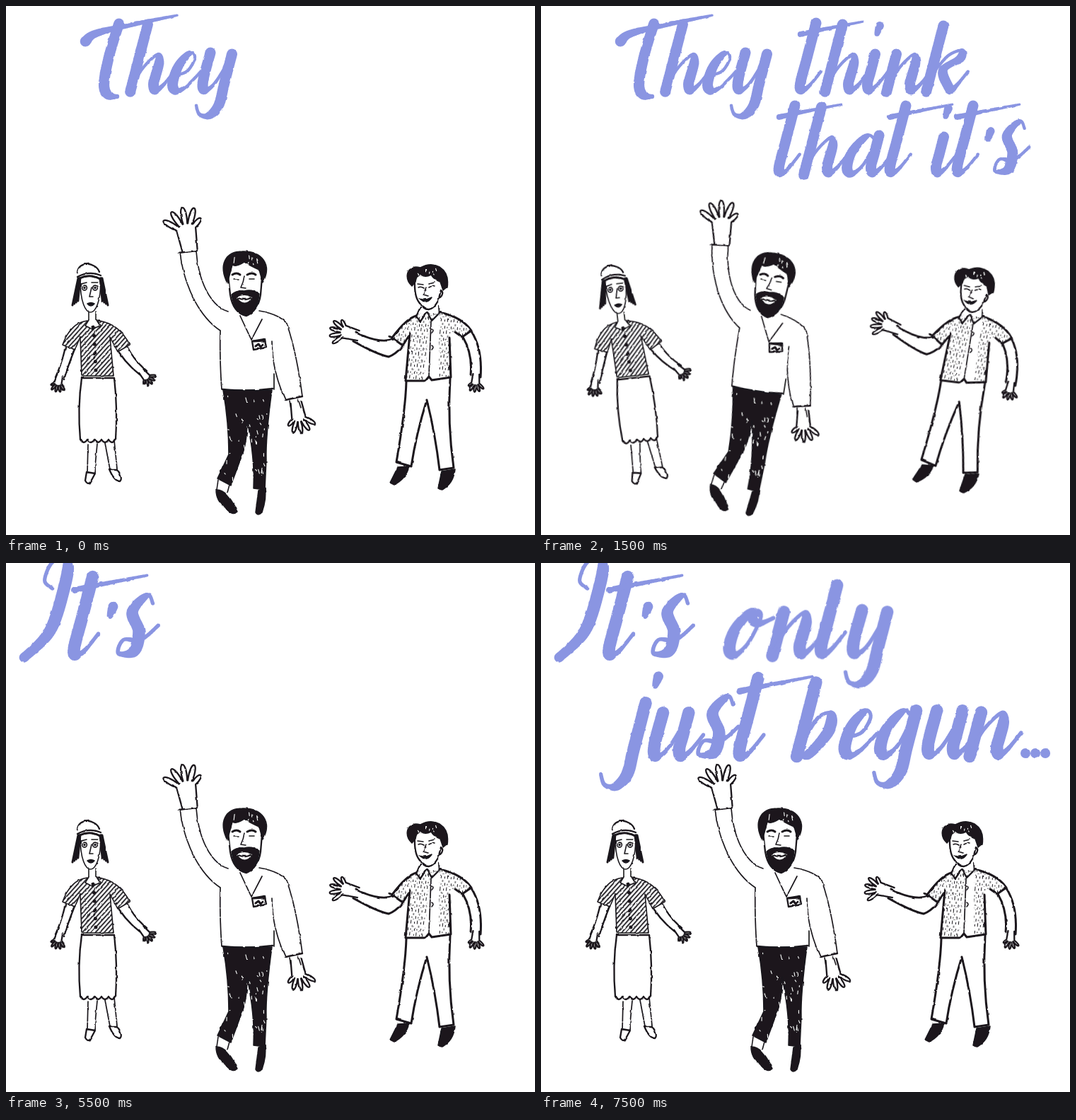
Recreate the animation shown at these times as an HTML page. Size 748 by 748 pixels, loop 8 s.

```html
<!DOCTYPE html>
<html lang="en">
<head>
<meta charset="utf-8">
<title>Waving people</title>
<style>
  html, body { margin: 0; width: 100%; height: 100%; overflow: hidden; background: #fff; }
  svg { display: block; width: 100vw; height: 100vh; }
  #lettering { fill: #8a95e2; }
  .person { fill: none; stroke: #1a181c; stroke-width: 2.3; stroke-linecap: round; stroke-linejoin: round; }
  .ink { fill: #1a181c; stroke-width: 1.5; }
  .white { fill: #fff; stroke: none; }
  .scratch { stroke: #fff; stroke-width: 1.1; }
  .bold { stroke-width: 3; }
  .fine { stroke-width: 1.6; }
  .loose { stroke-width: 1.7; stroke-dasharray: 28 2 11 2; }
</style>
</head>
<body>
<svg viewBox="0 0 748 748" role="img" aria-label="They think that it's all over! It's only just begun...">
  <defs>
    <filter id="rough">
      <feTurbulence type="fractalNoise" baseFrequency=".1" numOctaves="2" seed="4"/>
      <feDisplacementMap in="SourceGraphic" scale="2.4" xChannelSelector="R" yChannelSelector="G"/>
    </filter>
    <pattern id="hatch" width="4.6" height="20" patternUnits="userSpaceOnUse" patternTransform="rotate(42)">
      <path d="M2 0V20" stroke="#1a181c" stroke-width="1.8"/>
    </pattern>
    <pattern id="speckle" width="9" height="17" patternUnits="userSpaceOnUse" patternTransform="rotate(6)">
      <path d="M1.5 0v5M4 7v3M6.5 2v3M2 12v2M7.5 11v4M4.5 15v1" stroke="#1a181c"/>
    </pattern>
  </defs>

  <g id="lettering" filter="url(#rough)"></g>

  <g class="person" data-sway="rotate(-6.3 130 520)"><g id="woman" filter="url(#rough)">
    <path class="fine" fill="url(#hatch)" d="M115 445Q91 448 80 479L97 487L105 468L107 523H152L147 468L158 489L175 479Q160 449 131 445L123 458Z"/>
    <path d="M101 377C102 360 127 362 132 376M101 383Q118 374 134 381"/>
    <path class="bold" d="M104 385Q119 378 133 386"/>
    <path class="fine" d="M105 388C105 448 134 448 134 388M106 393L114 391M121 391L130 391M121 398L118 411H123M117 432V445M127 432V445"/>
    <path class="ink" d="M115 421Q120 418 125 421Q120 427 115 421Z"/>
    <path class="fine" fill="#fff" d="M117 444L112 452L122 457L133 452L128 444"/>
    <path stroke-width="5" stroke-dasharray="0 12.2" d="M124 454L127 516"/>
    <path d="M84 483Q79 505 70 525M96 488Q88 508 82 528M172 483Q182 502 199 516M160 490Q172 508 189 521"/>
    <path d="M107 526Q101 570 105 613M153 526Q158 570 155 613M107 526H153"/>
    <path class="loose" d="M116 620L115 660M129 619L125 661M140 618L147 655M153 614L157 654"/>
    <path d="M114 659L112 671Q115 677 119 674L126 661ZM146 655Q153 672 161 672Q166 668 157 655Z"/>
  </g></g>

  <g class="person" data-sway="rotate(9 316 316)"><g id="man" filter="url(#rough)">
    <path d="M244 349L270 346"/>
    <path class="loose" d="M246 349C251 390 270 437 303 459M269 347C272 390 290 425 314 432"/>
    <path class="ink" d="M313 392C300 366 310 347 334 347C362 346 377 366 363 391L358 373Q345 367 337 362Q325 370 320 366Z"/>
    <path d="M314 381L317 408Q321 434 340 438Q357 430 360 408L362 384"/>
    <path class="bold" d="M320 380Q326 376 331 380M341 380Q348 376 353 380"/>
    <path class="fine" d="M322 386H329M344 386H351M337 382Q336 390 332 398L339 399"/>
    <path class="ink" d="M319 408Q323 436 340 438Q356 432 358 407Q348 400 337 403Q326 402 319 408Z"/>
    <path class="white" d="M326 412Q337 406 348 412Q338 427 326 412Z"/>
    <path d="M328 413Q338 417 346 413"/>
    <path class="loose" d="M303 459Q302 500 305 542M358 431Q387 436 397 449Q411 490 419 552M331 438L347 472L362 443M376 474Q376 515 395 557M379 520V541"/>
    <path d="M395 557L419 552M306 542Q340 546 377 541M348 474L366 471L368 483L350 486Z"/>
    <path class="bold" d="M350 474L365 473M353 481L357 478L360 482L364 479"/>
    <path class="ink" d="M307 543H376Q367 610 368 642L366 684L350 682Q352 640 341 586Q341 620 332 640L318 678L299 668L315 634Q315 590 307 543Z"/>
    <path class="ink" d="M297 684Q313 683 327 715Q320 722 310 709Q297 700 297 684ZM357 685L366 683Q369 695 362 716Q356 722 353 716Z"/>
    <path class="fine" d="M300 670L298 684M316 677L313 688M401 558L403 570M413 556L417 568"/>
  </g></g>

  <g class="person" data-sway="rotate(7 572 528)"><g id="friend" filter="url(#rough)">
    <path stroke="none" fill="url(#speckle)" d="M582 436L565 445L546 469L561 480L571 465L566 529H590L599 448L611 434ZM613 433Q645 440 657 459L645 468L630 460L628 524H612V450Z"/>
    <path class="ink" d="M574 396Q565 388 568 377Q573 366 586 370Q600 362 613 369Q627 378 624 397L618 402L614 390Q605 387 601 380Q592 385 586 379Q580 381 579 390Z"/>
    <path d="M578 387Q577 410 584 419Q598 440 611 417L615 402Q620 406 614 412"/>
    <path class="fine" d="M582 393L590 394M583 398Q587 396 591 399M598 393L606 391M598 398Q602 395 606 397M594 398L590 408L597 410"/>
    <path class="ink" d="M585 414Q593 417 602 412Q595 423 585 414Z"/>
    <path d="M586 426L580 439L586 446L594 434M612 424L613 434L602 445L596 434"/>
    <path class="bold" d="M580 438Q566 442 546 469M543 467L561 480L570 466M571 463L565 530H593L598 524L602 529L629 525L627 469M613 433Q645 440 658 459L645 468L635 461"/>
    <path class="loose" d="M601 446L598 523"/>
    <path class="fine" d="M602 457Q606 460 602 463M602 480Q606 482 602 486"/>
    <path class="bold" d="M547 471Q529 478 495 462M491 474Q525 493 541 496Q550 493 560 482M658 460Q674 485 671 525M646 468Q660 492 657 522"/>
    <path class="bold" d="M566 531Q565 570 552 645L573 651Q580 605 595 557Q607 605 613 656L633 653Q624 590 628 527"/>
    <path class="ink" d="M554 652L570 651Q566 668 549 677L543 674ZM616 658L635 655Q633 675 617 684L611 682Z"/>
  </g></g>
</svg>

<script>
const LOOP = 8000, BEAT = 500, SLANT = .26;

function add(parent, tag, attrs) {
  const el = document.createElementNS('http://www.w3.org/2000/svg', tag);
  for (const name in attrs) el.setAttribute(name, attrs[name]);
  return parent.appendChild(el);
}

// Parts shared by the letters: upright, with the baseline at y = 0.
const stem = (x, top) => [[x, top], [x, 2]];
const hook = (x, top) => [[x, top], [x, top / 2], [x, -10], [x + 5, -1], [x + 14, -8], [x + 25, -28]];
const arch = x => [[x, -6], [x + 9, -32], [x + 24, -51], ...hook(x + 30, -42)];
const cup = x => [[x, -54], [x, -14], [x + 6, -1], [x + 18, -12], [x + 31, -50]];
const tail = (x, top) => [[x, top], [x, -10], [x, 20], [x - 10, 35], [x - 24, 33], [x - 32, 20]];
const bowl = w => [[w, -46], [w * .6, -54], [w * .1, -32], [w * .05, -8], [w * .35, 0], [w * .75, -14], [w, -44]];
const taper = (width, ...points) => Object.assign(points, { width });
const dab = (x, y) => taper(12, [x, y], [x - 1, y + 12]);
const dot = () => taper(12, [0, 0], [1, 0]);
const bar = () => taper(8, [-18, -80], [8, -86], [66, -98]);

// Each letter: its advance, then its strokes.
const LETTERS = {
  T: [68, taper(15, [-14, -70], [6, -84], [107, -107]), [[27, -95], [25, -50], [28, -10], [38, 6], [52, 8]]],
  I: [61, [[16, -82], [4, -92], [8, -114], [26, -114], [30, -80], [26, -30], [3, 2]]],
  a: [62, bowl(32), hook(35, -54)],
  b: [55, stem(0, -88), [[4, -20], [14, -46], [28, -50], [30, -28], [12, 0], [0, -8]]],
  e: [42, [[0, -22], [16, -28], [22, -46], [14, -54], [2, -36], [0, -10], [8, 0], [20, -6], [36, -28]]],
  g: [58, bowl(30), tail(33, -54)],
  h: [57, stem(0, -94), arch(0)],
  i: [30, hook(0, -52), dab(-4, -92)],
  j: [24, tail(0, -66), dab(7, -98)],
  k: [56, stem(0, -92), [[4, -28], [18, -50], [34, -57], [36, -46], [16, -30], [28, -8], [37, -3], [52, -28]]],
  l: [38, hook(0, -84)],
  n: [56, stem(0, -52), arch(0)],
  o: [56, [...bowl(30), [25, -53], [20, -44], [30, -38], [46, -45]]],
  r: [78, stem(0, -50), [[0, -8], [8, -32], [22, -48], [32, -42], [50, -53]]],
  s: [50, [[28, -64], [19, -74], [6, -54], [20, -30], [20, -6], [2, -4], [4, -20], [25, -20], [42, -38]]],
  t: [38, hook(0, -96), bar()],
  u: [54, cup(0), hook(31, -54)],
  v: [46, [[0, -46], [4, -10], [8, -1], [20, -16], [32, -46], [42, -42]]],
  y: [0, cup(0), tail(31, -52)],
  "'": [15, dab(-4, -60)],
  '!': [0, taper(17, [0, -78], [2, -10]), dab(2, 8)],
  '.': [12, dot()]
};

// One word appears on every beat.
const PHRASES = [
  { start: 0, end: 5500, scale: 1, words: [
    ['They', 108, 120], ['think', 364, 120], ['that', 334, 237], ["it's", 556, 237], ['all', 100, 334], ['over!', 268, 328]] },
  { start: 5500, end: LOOP, scale: 1.17, words: [
    ["It's", 22, 132], ['only', 262, 130], ['just', 128, 275], ['begun', 362, 272], ['...', 685, 269]] }
];

const spline = (a, b, c, d, u) =>
  b + u / 2 * (c - a + u * (2 * a - 5 * b + 4 * c - d + u * (3 * (b - c) + d - a)));

// Presses the brush on downward movement and lifts it on the way up.
function brush(parent, stroke) {
  const p = stroke.map(([x, y]) => [x - SLANT * y, y]);
  const last = p.length - 1;
  let [x, y] = p[0], width, d = '';
  for (let i = 0; i < last; i++) {
    const from = p[i], to = p[i + 1];
    const before = p[i - 1] || from, after = p[i + 2] || to;
    const steps = Math.ceil(Math.hypot(to[0] - from[0], to[1] - from[1]) / 1.5);
    for (let k = 1; k <= steps; k++) {
      const [nx, ny] = [0, 1].map(c => spline(before[c], from[c], to[c], after[c], k / steps));
      const down = Math.max(0, (ny - y) / (Math.hypot(nx - x, ny - y) || 1));
      const target = stroke.width ? stroke.width - (stroke.width - 3) * (i + (k - 1) / steps) / last : 4.5 + 11 * down;
      width = width === undefined ? target : width + (target - width) * .2;
      const r = width / 2;
      d += `M${x - r} ${y}a${r} ${r} 0 1 0 ${width} 0a${r} ${r} 0 1 0 ${-width} 0`;
      [x, y] = [nx, ny];
    }
  }
  add(parent, 'path', { d });
}

const lettering = document.getElementById('lettering');
const words = PHRASES.flatMap(({ start, end, scale, words }) => words.map(([text, x, y], i) => {
  const group = add(lettering, 'g', { transform: `translate(${x} ${y}) scale(${scale})` });
  let pen = 0;
  for (const char of text) {
    const [advance, ...strokes] = LETTERS[char];
    const letter = add(group, 'g', { transform: `translate(${pen})` });
    strokes.forEach(stroke => brush(letter, stroke));
    pen += advance;
  }
  return { group, start: start + i * BEAT, end };
}));

// Five finger loops fanned around a palm, with the thumb last.
function hand(person, x, y, direction, size) {
  const at = (angle, r) => {
    const a = (direction + angle) * Math.PI / 180;
    return `${x + r * Math.cos(a)} ${y + r * Math.sin(a)} `;
  };
  let d = 'M' + at(-155, size * .65);
  for (let i = 0; i < 5; i++) {
    const angle = (i - 2) * 25, tip = size * (i === 4 ? .9 : 1.2);
    d += `L${at(angle - 11, size * .4)}C${at(angle - 9, tip)}${at(angle + 9, tip)}${at(angle + 11, size * .4)}`;
  }
  add(person, 'path', { d: d + 'L' + at(155, size * .65) });
}

const { woman, man, friend } = window;
hand(woman, 74, 531, 105, 15);
hand(woman, 197, 523, 50, 15);
hand(man, 256, 323, -100, 39);
hand(man, 413, 577, 80, 28);
hand(friend, 483, 462, 195, 26);
hand(friend, 664, 530, 95, 16);

for (const side of [-1, 1]) {
  for (let i = 0; i < 4; i++) {
    add(woman, 'path', { class: 'bold', d: `M${119 + side * (17 - i)} 385L${119 + side * (25 - i * 2.6)} ${423 - i * 2}` });
  }
  const eye = { cx: 118.5 + side * 7.5, cy: 398.5 };
  add(woman, 'circle', { ...eye, r: 3.4, class: 'fine' });
  add(woman, 'circle', { ...eye, r: 1, class: 'ink' });
}
add(woman, 'path', { d: 'M105 613' + 'q5 8 10 0'.repeat(5) });

let seed = 7;
const random = () => (seed = seed * 16807 % 2147483647) / 2147483647;
function scratches(person, x, y, w, h, count, length) {
  for (let i = 0; i < count; i++) {
    add(person, 'path', { class: 'scratch', d: `M${x + w * random()} ${y + h * random()}l${2 - 3 * random()} ${length * random()}` });
  }
}
scratches(man, 309, 550, 60, 120, 38, 7);
scratches(man, 314, 351, 46, 14, 7, 8);
scratches(friend, 573, 371, 46, 10, 5, 6);

const people = document.querySelectorAll('.person');
let shownBeat;
function draw() {
  const t = performance.now() % LOOP;
  const beat = Math.floor(t / BEAT);
  if (beat !== shownBeat) {
    shownBeat = beat;
    const swayed = beat < 11 ? beat >= 5 || beat % 2 === 1 : beat === 12;
    for (const { group, start, end } of words) group.style.display = t >= start && t < end ? '' : 'none';
    for (const person of people) person.setAttribute('transform', swayed ? person.dataset.sway : '');
  }
  requestAnimationFrame(draw);
}
draw();
</script>
</body>
</html>
```
